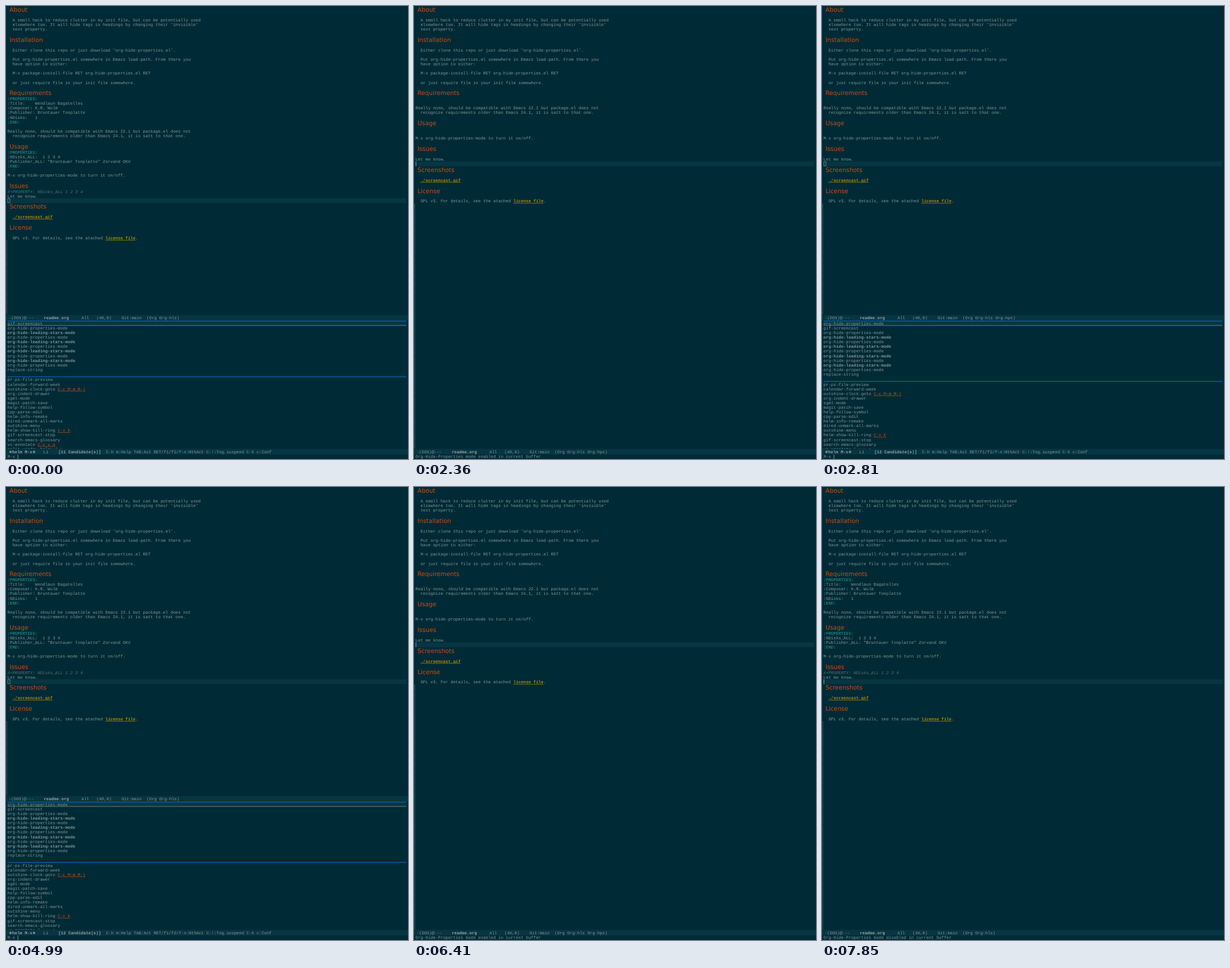
Recreate the animation shown at these times as an HTML page. Size 706 px wide and 794 px high, loop 8 s.

```html
<!DOCTYPE html>
<html lang="en">
<head>
<meta charset="utf-8">
<title>org-hide-properties</title>
<style>
html, body { margin: 0; width: 100%; height: 100%; overflow: hidden; background: #002b36; }
svg { position: absolute; left: 0; top: 0; display: block; }
text {
  font: 7.35px "Liberation Mono", monospace;
  fill: #839496; white-space: pre; text-rendering: geometricPrecision;
}
.head { font: 10.6px "DejaVu Sans", sans-serif; fill: #cb4b16; }
.drawer { fill: #2aa198; }
.meta { fill: #586e75; font-style: italic; }
.link { fill: #b58900; font-weight: bold; text-decoration: underline; }
.key { fill: #cb4b16; text-decoration: underline; }
.bold { font-weight: bold; }
.name { fill: #93a1a1; font-weight: bold; }
</style>
</head>
<body>
<svg id="stage" width="706" height="794" viewBox="0 0 706 794"></svg>
<script>
const ROW = 8.08, HEAD = 12.5, LEFT = 2.6, RIGHT = 703;
const BAR = '#073642', GREY = '#839496';
const stage = document.getElementById('stage');

function add(parent, tag, attrs = {}, content) {
  const node = document.createElementNS('http://www.w3.org/2000/svg', tag);
  for (const key in attrs) node.setAttribute(key, attrs[key]);
  if (content !== undefined) node.textContent = content;
  return parent.appendChild(node);
}

function rect(parent, x, y, width, height, fill) {
  return add(parent, 'rect', { x, y, width, height, fill });
}

// A line is a string or a list of strings and [string, class] pairs.
function write(parent, x, y, line) {
  const node = add(parent, 'text', { x, y });
  for (const part of [].concat(typeof line === 'string' ? [line] : line)) {
    const [content, style] = typeof part === 'string' ? [part, ''] : part;
    add(node, 'tspan', { class: style }, content);
  }
}

const h = title => ({ title });
const drawer = name => [[`:${name}:`, 'drawer']];

function readme(hidden) {
  const unless = lines => hidden ? [''] : lines;
  return [
    h('About'), '',
    '  A small hack to reduce clutter in my init file, but can be potentially used',
    "  elsewhere too. It will hide tags in headings by changing their 'invisible'",
    '  text property.', '',
    h('Installation'), '',
    "  Either clone this repo or just download 'org-hide-properties.el'.", '',
    '  Put org-hide-properties.el somewhere in Emacs load-path. From there you',
    '  have option to either:', '',
    '  M-x package-install-file RET org-hide-properties.el RET', '',
    '  or just require file in your init file somewhere.', '',
    h('Requirements'),
    ...unless([
      drawer('PROPERTIES'),
      ':Title:    Wendlaun Bagatelles',
      ':Composer: K.R. Wulm',
      ':Publisher: Bruntauer Tonplatte',
      ':NDisks:   1',
      drawer('END')
    ]), '',
    'Really none, should be compatible with Emacs 22.1 but package.el does not',
    '  recognize requirements older than Emacs 24.1, it is satt to that one.', '',
    h('Usage'),
    ...unless([
      drawer('PROPERTIES'),
      ':NDisks_ALL:  1 2 3 4',
      ':Publisher_ALL: "Bruntauer Tonplatte" Zorvand OKV',
      drawer('END')
    ]), '',
    'M-x org-hide-properties-mode to turn it on/off.', '',
    h('Issues'),
    ...unless([[['#+PROPERTY: NDisks_ALL 1 2 3 4', 'meta']]]),
    'Let me know.',
    { cursor: true },
    h('Screenshots'), '',
    ['  ', ['./screencast.gif', 'link']], '',
    h('License'), '',
    ['  GPL v3. For details, see the atached ', ['license file', 'link'], '.']
  ];
}

function drawCursor(g, y, active) {
  rect(g, LEFT, y, RIGHT - LEFT, ROW, BAR);
  if (active) rect(g, 2.8, y, 1.2, ROW, GREY);
  else add(g, 'rect', {
    x: 3.1, y: y + 0.4, width: 3.9, height: ROW - 0.8,
    fill: 'none', stroke: GREY, 'stroke-width': 0.8
  });
}

function drawReadme(g, hidden, active, bottom) {
  let y = 0;
  for (const line of readme(hidden)) {
    if (line.title) {
      add(g, 'text', { x: 6.2, y: y + 10.1, class: 'head' }, line.title);
      y += HEAD;
      continue;
    }
    if (line.cursor) drawCursor(g, y, active);
    else write(g, LEFT, y + 6.5, line);
    y += ROW;
  }
  add(g, 'line', {
    x1: 1.3, x2: 1.3, y1: y + 0.6, y2: bottom,
    stroke: '#5b7178', 'stroke-width': 1.1, 'stroke-dasharray': '1.6 1.1'
  });
}

function modeLine(g, y, line) {
  rect(g, 0, y, 706, 9.8, BAR);
  write(g, 4.7, y + 7.4, line);
}

function fileModeLine(g, y, hidden) {
  modeLine(g, y, [
    '-(DOS)@---    ', ['readme.org', 'name'],
    `     All   (40,0)    Git:main  (Org Org-hls${hidden ? ' Org-hps' : ''})`
  ]);
}

const HIDE = 'org-hide-properties-mode';
const STARS = [['org-hide-leading-stars-mode', 'bold']];
const RECENT = ['gif-screencast', HIDE, STARS, HIDE, STARS, HIDE, STARS, HIDE, STARS, HIDE, 'replace-string'];
const bound = (name, keys) => [name + ' ', [keys, 'key']];
const COMMANDS = [
  'pr-ps-file-preview', 'calendar-forward-week', bound('outshine-clock-goto', 'C-c M-m M-j'),
  'org-indent-drawer', 'sgml-mode', 'magit-patch-save', 'help-follow-symbol',
  'cpp-parse-edit', 'helm-info-remake', 'dired-unmark-all-marks', 'outshine-menu',
  bound('helm-show-kill-ring', 'C-x k'), 'gif-screencast-stop', 'search-emacs-glossary',
  bound('vc-annotate', 'C-x v g'), bound('split-window-below', 'C-x')
];

function drawHelm(g, recent, selected) {
  const top = 552.5;
  const rule = y => rect(g, LEFT, y, RIGHT - LEFT, 1.3, '#0b61b4');
  const list = (items, y) => items.forEach((item, i) => write(g, LEFT, y + i * ROW + 6.5, item));
  const y = top + selected * ROW;
  rect(g, LEFT, y, RIGHT - LEFT, ROW, BAR);
  rect(g, LEFT, y + 7, RIGHT - LEFT, 0.9, '#718588');
  rule(551.6);
  list(recent, top);
  const second = top + (recent.length + 1) * ROW;
  rule(second - 0.2);
  list(COMMANDS, second + 1.5);
  rect(g, 0, 776, 706, 18, '#002b36');
  modeLine(g, 776.3, [
    ['∗helm M-x∗', 'name'], `   L${selected + 1}    `,
    [`[${recent.length} Candidate(s)]`, 'name'],
    '  C-h m:Help TAB:Act RET/f1/f2/f-n:NthAct C-!:Tog.suspend C-h c:Conf'
  ]);
  write(g, LEFT, 792.4, 'M-x');
  rect(g, 20.4, 786.3, 1, 7.7, GREY);
}

function editor(hidden) {
  const g = add(stage, 'g');
  drawReadme(g, hidden, true, 776);
  fileModeLine(g, 776.3, hidden);
  write(g, LEFT, 792.4, `Org-Hide-Properties mode ${hidden ? 'enabled' : 'disabled'} in current buffer`);
  return g;
}

function picker(hidden, recent, selected) {
  const g = add(stage, 'g');
  drawReadme(g, hidden, false, 541);
  fileModeLine(g, 541.7, hidden);
  drawHelm(g, recent, selected);
  return g;
}

const LATER = [HIDE, ...RECENT];
const enabled = editor(true), disabled = editor(false);
const pickHidden = picker(true, LATER, 0);
const steps = [
  [0, picker(false, RECENT, 0)],
  [1000, picker(false, RECENT, 1)],
  [2360, enabled],
  [2810, pickHidden],
  [4040, disabled],
  [4990, picker(false, LATER, 0)],
  [6410, enabled],
  [6890, pickHidden],
  [7850, disabled]
];

const start = performance.now();
let shown;
function draw(now) {
  const t = Math.max(0, now - start) % 8000;
  const current = steps.filter(([from]) => from <= t).pop()[1];
  if (current !== shown) {
    for (const [, g] of steps) g.style.display = g === current ? '' : 'none';
    shown = current;
  }
  requestAnimationFrame(draw);
}
draw(start);
</script>
</body>
</html>
```
